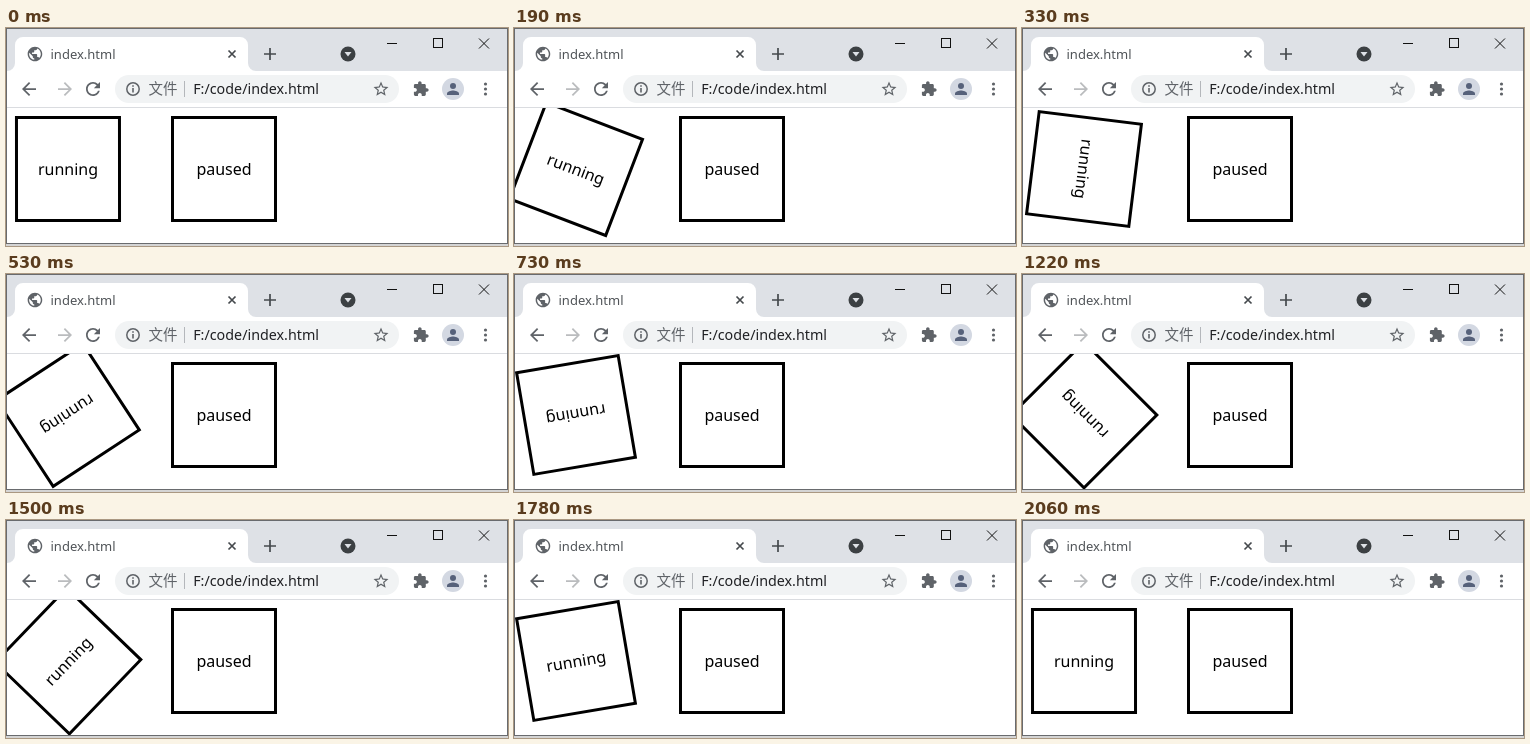
Recreate the animation shown at these times as an HTML page. Size 502 by 218 pixels, loop 2130 ms.

```html
<!DOCTYPE html>
<html lang="en">
<head>
<meta charset="utf-8">
<title>Animation play state</title>
<style>
  html, body { margin: 0; width: 100%; height: 100%; overflow: hidden; background: #fff; }
  svg { display: block; width: 502px; height: 218px; }
  text { font-family: "Noto Sans", "Open Sans", sans-serif; }
  .cjk { font-family: "Noto Sans CJK SC", "Noto Sans CJK", sans-serif; }
  .icon { fill: #5f6368; }
  .box rect { fill: #fff; stroke: #000; stroke-width: 3; }
  .box text { font-size: 16px; text-anchor: middle; fill: #000; }
</style>
</head>
<body>
<svg viewBox="0 0 502 218">
  <defs>
    <clipPath id="page"><rect x="1" y="80" width="500" height="135"/></clipPath>
  </defs>

  <!-- window -->
  <rect width="502" height="218" fill="#d4d4d4"/>
  <rect width="502" height="216" fill="#696b6e"/>
  <rect x="1" y="1" width="500" height="214" fill="#fff"/>
  <rect x="1" y="1" width="500" height="42" fill="#dee1e6"/>
  <rect x="1" y="79" width="500" height="1" fill="#dadce0"/>

  <!-- tab -->
  <path d="M1 43a8 8 0 0 0 8-8V17a8 8 0 0 1 8-8H234a8 8 0 0 1 8 8V35a8 8 0 0 0 8 8z" fill="#fff"/>
  <path class="icon" transform="translate(20.2 17.2) scale(.73)" d="M12 2C6.48 2 2 6.48 2 12s4.48 10 10 10 10-4.48 10-10S17.52 2 12 2zm-1 17.93c-3.95-.49-7-3.85-7-7.93 0-.62.08-1.21.21-1.79L9 15v1c0 1.1.9 2 2 2v1.93zm6.9-2.54c-.26-.81-1-1.39-1.9-1.39h-1v-3c0-.55-.45-1-1-1H8v-2h2c.55 0 1-.45 1-1V7h2c1.1 0 2-.9 2-2v-.41c2.93 1.19 5 4.06 5 7.41 0 2.08-.8 3.97-2.1 5.39z"/>
  <text x="44.5" y="31" font-size="13" fill="#505458">index.html</text>
  <g fill="none" stroke="#45494d" stroke-width="1.7">
    <path d="M222.5 22.5l7 7m0-7l-7 7"/>
    <path d="M258 26h12m-6-6v12"/>
  </g>
  <circle cx="342" cy="26" r="7.5" fill="#3c4043"/>
  <path d="M338.5 24h7l-3.5 4.5z" fill="#dee1e6"/>
  <g fill="none" stroke="#111" stroke-width="1">
    <path d="M381 15.5h10"/>
    <rect x="427.5" y="10.5" width="9" height="9"/>
    <path d="M473 10.5l10 10m0-10l-10 10"/>
  </g>

  <!-- toolbar -->
  <path class="icon" transform="translate(12.5 50.5) scale(.875)" d="M20 11H7.83l5.59-5.59L12 4l-8 8 8 8 1.41-1.41L7.83 13H20v-2z"/>
  <path fill="#babcbe" transform="translate(69.5 50.5) scale(-.875 .875)" d="M20 11H7.83l5.59-5.59L12 4l-8 8 8 8 1.41-1.41L7.83 13H20v-2z"/>
  <path class="icon" transform="translate(76.5 50.5) scale(.875)" d="M17.65 6.35C16.2 4.9 14.21 4 12 4c-4.42 0-7.99 3.58-7.99 8s3.57 8 7.99 8c3.73 0 6.84-2.55 7.73-6h-2.08c-.82 2.33-3.04 4-5.65 4-3.31 0-6-2.69-6-6s2.69-6 6-6c1.66 0 3.14.69 4.22 1.78L13 11h7V4l-2.35 2.35z"/>
  <rect x="109" y="47" width="284" height="28" rx="14" fill="#f1f3f4"/>
  <circle cx="127" cy="61" r="6.2" fill="none" stroke="#5f6368" stroke-width="1.5"/>
  <path class="icon" d="M126.2 60h1.6v4.5h-1.6zM126.2 57.2h1.6v1.6h-1.6z"/>
  <text class="cjk" x="142.5" y="66" font-size="14.5" fill="#5f6368">文件</text>
  <rect x="178" y="53" width="1" height="16" fill="#b4b7bb"/>
  <text x="187.2" y="66" font-size="14.3" fill="#202124">F:/code/index.html</text>
  <path class="icon" transform="translate(366 52) scale(.75)" d="M22 9.24l-7.19-.62L12 2 9.19 8.63 2 9.24l5.46 4.73L5.82 21 12 17.27 18.18 21l-1.63-7.03L22 9.24zM12 15.4l-3.76 2.27 1-4.28-3.32-2.88 4.38-.38L12 6.1l1.71 4.04 4.38.38-3.32 2.88 1 4.28L12 15.4z"/>
  <path class="icon" transform="translate(406.5 52.5) scale(.7)" d="M20.5 11H19V7c0-1.1-.9-2-2-2h-4V3.5C13 2.12 11.88 1 10.5 1S8 2.12 8 3.5V5H4c-1.1 0-1.99.9-1.99 2v3.8H3.5c1.49 0 2.7 1.21 2.7 2.7s-1.21 2.7-2.7 2.7H2V20c0 1.1.9 2 2 2h3.8v-1.5c0-1.49 1.21-2.7 2.7-2.7 1.49 0 2.7 1.21 2.7 2.7V22H17c1.1 0 2-.9 2-2v-4h1.5c1.38 0 2.5-1.12 2.5-2.5S21.88 11 20.5 11z"/>
  <circle cx="447" cy="61" r="11" fill="#d3d8e2"/>
  <g fill="#56617a">
    <circle cx="447" cy="58" r="3"/>
    <path d="M441 67v-1.5c0-2 4-3 6-3s6 1 6 3V67z"/>
  </g>
  <g class="icon">
    <circle cx="479.5" cy="56" r="1.6"/>
    <circle cx="479.5" cy="61" r="1.6"/>
    <circle cx="479.5" cy="66" r="1.6"/>
  </g>

  <!-- page -->
  <g clip-path="url(#page)">
    <g class="box" id="spinner">
      <rect x="10.5" y="89.5" width="103" height="103"/>
      <text x="62" y="147">running</text>
    </g>
    <g class="box">
      <rect x="166.5" y="89.5" width="103" height="103"/>
      <text x="218" y="147">paused</text>
    </g>
  </g>
</svg>
<script>
  const LOOP = 2130, STEPS = 31, STEP_MS = 200 / 3, LAG = 20;
  const spinner = document.getElementById('spinner');

  // Ticks at 15 per second rounded down to 10 ms, then every 70 ms.
  const stepStart = i => i <= 12 ? Math.floor(i * 20 / 3) * 10 : 800 + (i - 12) * 70;
  const starts = Array.from({ length: STEPS }, (_, i) => stepStart(i));

  const bezier = (a, b, u) => 3 * a * u * (1 - u) ** 2 + 3 * b * u * u * (1 - u) + u ** 3;

  // CSS "ease": cubic-bezier(.25, .1, .25, 1)
  function ease(x) {
    let lo = 0, hi = 1;
    for (let i = 0; i < 30; i++) {
      const mid = (lo + hi) / 2;
      if (bezier(.25, .25, mid) < x) lo = mid; else hi = mid;
    }
    return bezier(.1, 1, lo);
  }

  // Each half turn takes one second and eases separately.
  function angleAt(step) {
    const sec = (step * STEP_MS - LAG) / 1000;
    const half = Math.floor(sec);
    return 180 * (half + ease(sec - half));
  }

  const origin = performance.now();
  function draw() {
    const t = (performance.now() - origin) % LOOP;
    const step = starts.filter(s => s <= t).length - 1;
    spinner.setAttribute('transform', `rotate(${angleAt(step).toFixed(2)} 62 141)`);
    requestAnimationFrame(draw);
  }
  draw();
</script>
</body>
</html>
```
